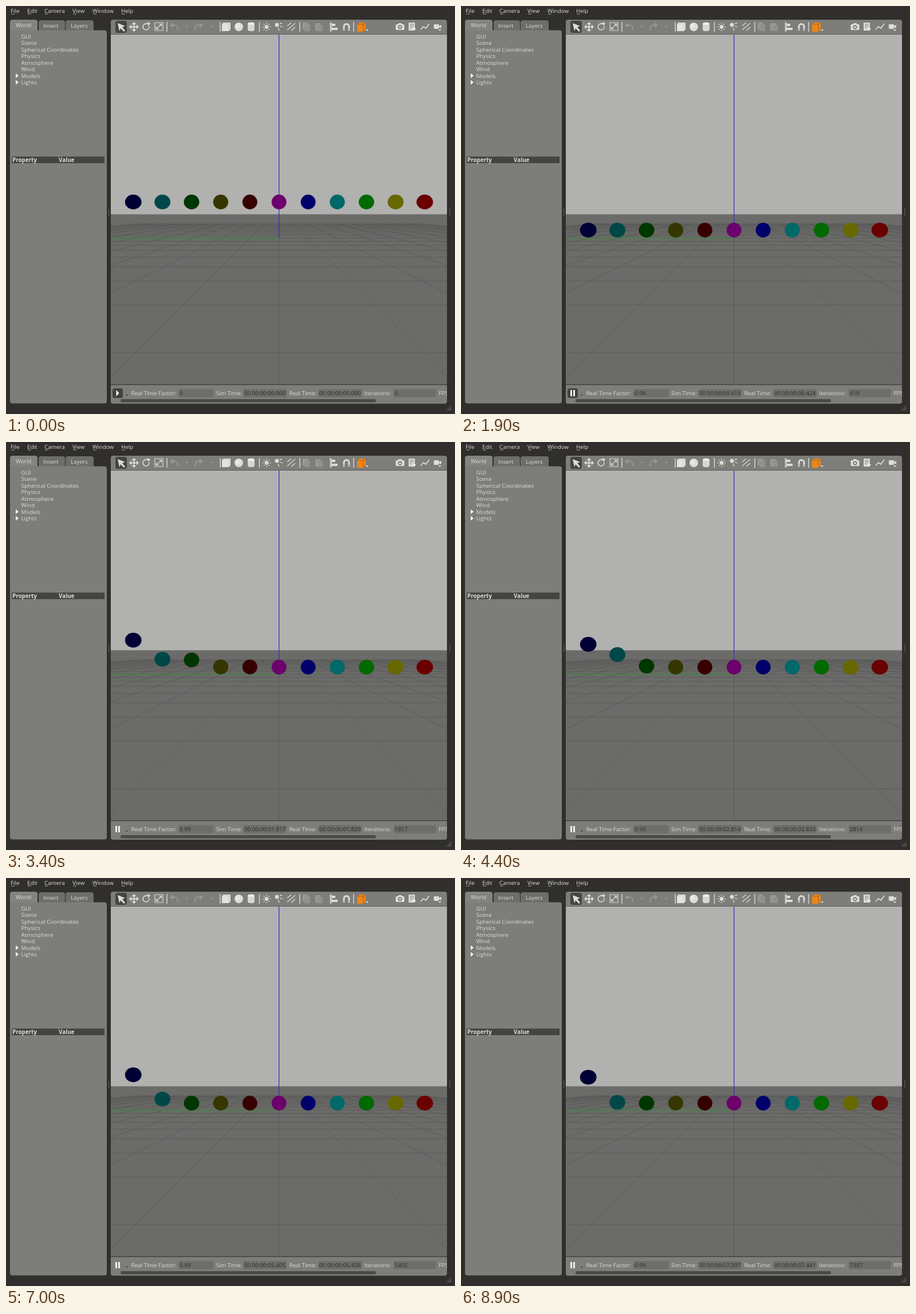
Recreate the animation shown at these times as an HTML page with a canvas. Size 784 px wide and 714 px high, loop 9000 ms.

```html
<!DOCTYPE html>
<html lang="en">
<head>
<meta charset="utf-8">
<title>Bouncing spheres</title>
<style>
html, body { margin: 0; width: 100%; height: 100%; overflow: hidden; background: #302f2d; }
canvas { display: block; }
</style>
</head>
<body>
<canvas id="stage" width="784" height="714"></canvas>
<script>
const ctx = document.getElementById('stage').getContext('2d');
const LOOP = 9000, STEP = 100, PLAY_AT = 1500;
const PANEL = '#7d7d7a', LIGHT = '#dfdcd8', FAINT = '#989895', DARK = '#30302e';

// Scene: a level camera 10 m from the origin
const CENTER_X = 476.7, EYE_Y = 356, GROUND = 502, METER = 50.9;

const COLORS = ['#000035', '#004848', '#003600', '#363600', '#360000', '#6c006c',
  '#00006c', '#006868', '#006a00', '#686800', '#6a0000'];
const BOUNCE = [1, .907, .8, .7, .6, .5, .4, .3, .2, .1, 0];
const DROP_AT = 1452, FALL = 456, MIN_FIRST_BOUNCE = .744;

// [stage time, simulated time, real time]
const CLOCK = [[1500, 20, 22], [1900, 419, 424], [2500, 1018, 1026], [3400, 1817, 1829],
  [5400, 3811, 3834], [7000, 5405, 5438], [8900, 7397, 7441]];

function box(x, y, w, h, color, radius = 0) {
  ctx.fillStyle = color;
  ctx.beginPath();
  ctx.roundRect(x, y, w, h, radius);
  ctx.fill();
}

function shape(d, color = LIGHT) {
  ctx.fillStyle = color;
  ctx.fill(new Path2D(d));
}

function stroke(d, color = LIGHT, width = 1) {
  ctx.strokeStyle = color;
  ctx.lineWidth = width;
  ctx.stroke(new Path2D(d));
}

function oval(x, y, rx, ry, color) {
  ctx.fillStyle = color;
  ctx.beginPath();
  ctx.ellipse(x, y, rx, ry, 0, 0, 7);
  ctx.fill();
}

function label(text, x, y, color = LIGHT, weight = 400) {
  ctx.font = `${weight} 9.85px "Open Sans", "Noto Sans", sans-serif`;
  ctx.fillStyle = color;
  ctx.fillText(text, x, y);
}

function dots(x, y, dx, dy) {
  for (let i = 0; i < 6; i++) box(x + i * dx, y + i * dy, 1, 1, '#a2a29f');
}

function drawSidebar() {
  [['File', 8], ['Edit', 37], ['Camera', 67], ['View', 116], ['Window', 151], ['Help', 201]]
    .forEach(([name, x]) => {
      label(name, x, 12);
      box(x + 1, 13.5, 6, 1, '#aaa8a4');
    });

  box(57, 25, 46, 20, '#6d6d6a', [4, 4, 0, 0]);
  box(104, 25, 49, 20, '#6d6d6a', [4, 4, 0, 0]);
  box(7, 24, 48, 24, '#83837f', [4, 4, 0, 0]);
  box(7, 42.5, 169, 653, PANEL, [0, 4, 4, 4]);
  label('World', 17, 37);
  label('Insert', 65, 37.5);
  label('Layers', 113, 37.5);

  ['GUI', 'Scene', 'Spherical Coordinates', 'Physics', 'Atmosphere', 'Wind', 'Models', 'Lights']
    .forEach((name, i) => label(name, 26.5, 56.5 + i * 11.5));
  shape('M17 118l5 4-5 4zM17 129.500l5 4-5 4z', '#fff');

  dots(86, 262, 2.2, 0);
  box(10, 263.5, 162, 11.5, '#444442');
  label('Property', 11, 273, LIGHT, 700);
  label('Value', 92, 273, LIGHT, 700);
  dots(179, 355, 0, 2.2);
  dots(774.5, 355, 0, 2.2);
  for (let row = 0; row < 4; row++)
    for (let col = 0; col <= row; col++) box(776 - col * 2.2, 700 + row * 2.2, 1, 1, '#a2a29f');
}

function drawTools() {
  box(183, 24, 587, 672, PANEL, 4);
  [281, 374, 442.5, 513, 566.5, 607].forEach(x => box(x - .7, 28, 1.4, 17, LIGHT));

  // Select, move, rotate, scale
  box(191, 26, 20, 21, '#444442', 4);
  shape('M195 30l13 5-5 2 5 6-2 2-6-6-2 5z');
  shape('M223.500 28l4 4h-3v3.500h3.500v-3l4 4-4 4v-3h-3.500v3.500h3l-4 4-4-4h3v-3.500h-3.500v3l-4-4 4-4v3h3.500v-3.500h-3z');
  stroke('M247 31.500a5.500 5.500 0 1 0 3 4', LIGHT, 1.6);
  shape('M246 28l6 2-3 5z');
  stroke('M260 29h14v14h-14zM263 40l8-8M267 31.500h4.500v4.500M262.500 36v4.500h4.500', LIGHT, 1.2);

  // Undo, redo
  stroke('M289 34c7-2 11 0 11 8', FAINT, 2);
  shape('M286 34l6-5v9z', FAINT);
  stroke('M341 34c-7-2-11 0-11 8', FAINT, 2);
  shape('M344 34l-6-5v9z', FAINT);
  shape('M313 35h5l-2.500 3zM356 35h5l-2.500 3z', FAINT);

  // Solids
  shape('M377 31l3-2h12v12l-3 3h-12z', '#e5e3df');
  stroke('M377 31h12v13M389 31l3-2', '#bbb9b5', .7);
  oval(406.500, 36.500, 7.5, 7.5, '#dedcd8');
  oval(404.500, 34.500, 4, 4, '#eae8e4');
  box(422, 29, 12, 15, '#d8d6d2', 4);
  oval(428, 31, 6, 2.4, '#eeece8');

  // Lights
  oval(455, 36.500, 3.4, 3.4, LIGHT);
  for (let i = 0; i < 8; i++) {
    const x = Math.cos(i * Math.PI / 4), y = Math.sin(i * Math.PI / 4);
    stroke(`M${455 + x * 5} ${36.5 + y * 5}L${455 + x * 7.5} ${36.5 + y * 7.5}`, LIGHT, 1.2);
  }
  oval(473, 33, 3.5, 3.5, LIGHT);
  stroke('M478 31l4-1M478 35l5 2M475 38l2 5', LIGHT, 1.3);
  stroke('M491 35l7-6M491 42l14-12M498 43l7-6', LIGHT, 1.3);

  // Copy, paste, align, snap
  box(518, 29, 9, 12, FAINT);
  box(521, 32, 10, 12, '#91918e');
  box(540, 30, 10, 13, FAINT);
  box(544, 33, 9, 11, '#91918e');
  box(567.5, 29, 1.4, 15, LIGHT);
  box(569, 31, 6, 4, LIGHT);
  box(569, 38, 10, 4, LIGHT);
  stroke('M590 43v-7a4.500 4.500 0 0 1 9 0v7', LIGHT, 3);
  box(588.5, 40, 3, 1, PANEL);
  box(597.5, 40, 3, 1, PANEL);

  // View angle
  shape('M613 32l4-3h11v12l-4 4h-11z', '#ee8518');
  stroke('M613 32h11v13M624 32l4-3', '#a8641c', 1);
  shape('M628 41h5l-2.500 3z');

  // Camera, log, plot, video
  box(680.5, 32, 15, 10, LIGHT, 1.5);
  box(685, 30, 6, 3, LIGHT);
  oval(688, 37, 3.4, 3.4, '#666663');
  oval(688, 37, 2, 2, LIGHT);
  box(703, 29, 11, 14, LIGHT, 1);
  stroke('M705 32h7M705 35h7M705 38h4', '#777774', 1.2);
  shape('M710 39h6l-3 4z', '#f0eeea');
  stroke('M724 41l5-5 4 3 6-8', LIGHT, 1.7);
  box(747, 32, 9, 8, LIGHT, 1);
  shape('M756 35l4-2v6l-4-2zM755 41h5l-2.500 3z');
}

function drawGround() {
  box(183, 49, 587, 1, '#5b5b59');
  box(183, 50, 587, 315, '#b1b1af');
  box(183, 364.5, 587, 297.5, '#6b6b69');
  let grid = '';
  for (let n = -10; n <= 10; n++) {
    const far = GROUND / 20, near = 306;
    grid += `M${CENTER_X + n * far} ${EYE_Y + far}L${CENTER_X + n * near} ${EYE_Y + near}`;
  }
  for (let depth = 2; depth <= 20; depth++) {
    const drop = GROUND / depth;
    grid += `M${CENTER_X - 10 * drop} ${EYE_Y + drop}H${CENTER_X + 10 * drop}`;
  }
  stroke(grid, 'rgba(70,70,69,.52)', .8);
  stroke(`M183 406.300H${CENTER_X}`, '#2b962b', 1);
  stroke(`M${CENTER_X} 50V406`, '#3030c8', 1.2);
}

// Height above rest, as a share of the starting height
function heightAt(time, bounce) {
  let t = (time - DROP_AT) / FALL;
  if (t <= 0) return 1;
  if (t < 1) return 1 - t * t;
  t -= 1;
  let speed = Math.max(bounce, MIN_FIRST_BOUNCE);
  while (t > 2 * speed) {
    t -= 2 * speed;
    speed *= bounce;
    if (speed < .02) return 0;
  }
  return t * (2 * speed - t);
}

function drawBalls(time) {
  COLORS.forEach((color, i) => {
    const offset = (i - 5) * METER;
    const width = 12.9 * Math.hypot(1, offset / 509);
    oval(CENTER_X + offset, 394 - 51 * heightAt(time, BOUNCE[i]), width, 12.9, color);
  });
}

function clockAt(time) {
  if (time < PLAY_AT) return [0, 0];
  const next = Math.max(1, CLOCK.findIndex(key => key[0] >= time));
  const a = CLOCK[next - 1], b = CLOCK[next];
  const k = (time - a[0]) / (b[0] - a[0]);
  return [1, 2].map(i => Math.round(a[i] + (b[i] - a[i]) * k));
}

function field(name, nameX, value, x, width) {
  label(name, nameX, 681);
  box(x, 670.5, width, 14, '#6d6d6b', 2);
  label(value, x + 1.5, 681, '#2c2c2a');
}

function drawStatus(time) {
  const stamp = ms => '00 00:00:' + (ms / 1000).toFixed(3).padStart(6, '0');
  const [sim, real] = clockAt(time);
  const playing = time >= PLAY_AT;

  box(183, 662, 587, 1.2, '#3b3b39');
  if (time < 2900) box(186, 669, 18, 17, '#41413f', 4);
  if (playing) {
    box(191, 672, 3, 11, '#f0eeea');
    box(196, 672, 3, 11, '#f0eeea');
  } else shape('M192.500 672l5 5.500-5 5.500z', '#fff');
  shape('M209 680h4l-2 2z', DARK);

  const factor = !playing ? '0' : time < 2000 ? '0.98' : '0.99';
  field('Real Time Factor:', 218.5, factor, 301.5, 61);
  field('Sim Time:', 367, stamp(sim), 414.5, 75);
  field('Real Time:', 494.5, stamp(real), 545.5, 75.5);
  field('Iterations:', 625.5, String(sim), 677, 74);
  ctx.save();
  ctx.beginPath();
  ctx.rect(183, 663, 587, 32);
  ctx.clip();
  label('FPS:', 755.5, 681);
  ctx.restore();
  box(200, 688, 446, 5.5, '#4a4a48', 3);
}

function draw(now) {
  const time = Math.floor(now % LOOP / STEP) * STEP;
  box(0, 0, 784, 714, '#302f2d');
  drawSidebar();
  drawTools();
  ctx.save();
  ctx.beginPath();
  ctx.rect(183, 49, 587, 613);
  ctx.clip();
  drawGround();
  drawBalls(time);
  ctx.restore();
  drawStatus(time);
}

const start = performance.now();
function tick() {
  draw(performance.now() - start);
  requestAnimationFrame(tick);
}
tick();
</script>
</body>
</html>
```
